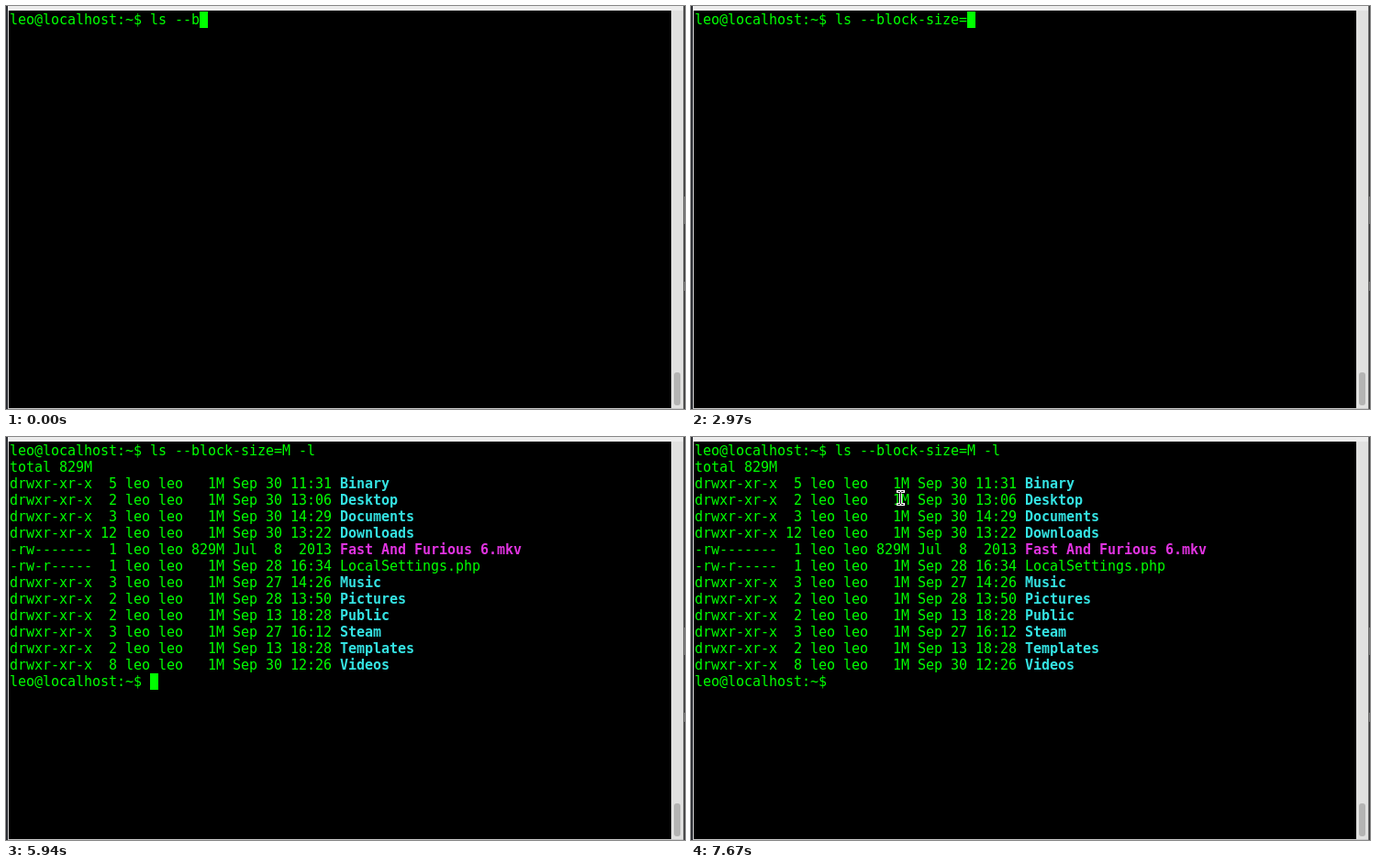
Recreate the animation shown at these times as an HTML page. Size 740x440 px, loop 8 s.

```html
<!DOCTYPE html>
<html lang="en">
<head>
<meta charset="utf-8">
<title>Terminal</title>
<style>
  html, body { margin: 0; width: 100%; height: 100%; overflow: hidden; background: #000; }
  svg { display: block; width: 740px; height: 440px; }
  text { font: 15px "DejaVu Sans Mono", monospace; fill: #0f0; white-space: pre; }
  .dir, .media { font-weight: bold; }
  .dir { fill: #34e2e2; }
  .media { fill: #e033e0; }
</style>
</head>
<body>
<svg id="stage" viewBox="0 0 740 440" xmlns="http://www.w3.org/2000/svg">
  <g shape-rendering="crispEdges">
    <rect width="740" height="440" fill="#000"/>
    <rect width="2" height="440" fill="#2b2d33"/>
    <rect x="2" width="1" height="440" fill="#d4d4d4"/>
    <rect x="2" width="736" height="5" fill="#ededed"/>
    <rect x="725" y="5" width="13" height="435" fill="#e1e1e0"/>
    <rect x="738" width="1" height="440" fill="#6e6e6e"/>
    <rect x="739" width="1" height="440" fill="#3c3c3c"/>
    <rect x="739" y="208" width="1" height="30" fill="#777"/>
    <rect x="739" y="301" width="1" height="10" fill="#777"/>
    <rect x="2" y="439" width="736" height="1" fill="#c8c8c8"/>
  </g>
  <rect x="728" y="400" width="7" height="36" rx="3" fill="#b4b4b3"/>
  <g id="command"></g>
  <g id="listing"></g>
  <rect id="caret" width="9" height="18" fill="#0f0"/>
  <g id="pointer" fill="none">
    <path d="M-3-7H-1L0-6L1-7H3M0-6V6M-3 7H-1L0 6L1 7H3" stroke="#fff" stroke-width="3" stroke-linecap="square"/>
    <path d="M-3-7H-1L0-6L1-7H3M0-6V6M-3 7H-1L0 6L1 7H3" stroke="#000" stroke-width="1"/>
  </g>
</svg>
<script>
const LOOP = 8000, CELL = 9, LINE = 18, LEFT = 4, TOP = 6;
const USER = 'leo';
const PROMPT = USER + '@localhost:~$ ';
const TYPED = 'ls --block-size=M -l';
const START = 6;
const KEYS = [60, 240, 420, 680, 1160, 1560, 1770, 2180, 2560, 2970, 3630, 4740, 5290, 5550];
const ENTER = 5940;

const FILES = [
  ['drwxr-xr-x', 5, '1M', 'Sep 30 11:31', 'Binary', 'dir'],
  ['drwxr-xr-x', 2, '1M', 'Sep 30 13:06', 'Desktop', 'dir'],
  ['drwxr-xr-x', 3, '1M', 'Sep 30 14:29', 'Documents', 'dir'],
  ['drwxr-xr-x', 12, '1M', 'Sep 30 13:22', 'Downloads', 'dir'],
  ['-rw-------', 1, '829M', 'Jul  8  2013', 'Fast And Furious 6.mkv', 'media'],
  ['-rw-r-----', 1, '1M', 'Sep 28 16:34', 'LocalSettings.php', 'file'],
  ['drwxr-xr-x', 3, '1M', 'Sep 27 14:26', 'Music', 'dir'],
  ['drwxr-xr-x', 2, '1M', 'Sep 28 13:50', 'Pictures', 'dir'],
  ['drwxr-xr-x', 2, '1M', 'Sep 13 18:28', 'Public', 'dir'],
  ['drwxr-xr-x', 3, '1M', 'Sep 27 16:12', 'Steam', 'dir'],
  ['drwxr-xr-x', 2, '1M', 'Sep 13 18:28', 'Templates', 'dir'],
  ['drwxr-xr-x', 8, '1M', 'Sep 30 12:26', 'Videos', 'dir']
];

const $ = id => document.getElementById(id);
const command = $('command'), listing = $('listing'), caret = $('caret'), pointer = $('pointer');
const colX = col => LEFT + col * CELL;
const show = (el, on) => el.setAttribute('visibility', on ? 'visible' : 'hidden');

// Places every character on the terminal grid.
function write(parent, str, row, col = 0, cls = '') {
  const el = document.createElementNS('http://www.w3.org/2000/svg', 'text');
  el.setAttribute('x', [...str].map((_, i) => colX(col + i)).join(' '));
  el.setAttribute('y', TOP + row * LINE + 14);
  if (cls) el.setAttribute('class', cls);
  el.textContent = str;
  parent.append(el);
  return el;
}

write(command, PROMPT.trim(), 0);
const letters = [...TYPED].map((ch, i) => write(command, ch, 0, PROMPT.length + i));

write(listing, 'total 829M', 1);
FILES.forEach(([mode, links, size, date, name, cls], i) => {
  const info = [mode, String(links).padStart(2), USER, USER, size.padStart(4), date].join(' ');
  write(listing, info, i + 2);
  write(listing, name, i + 2, 40, cls);
});
write(listing, PROMPT.trim(), 14);

function caretOn(t) {
  if (t < ENTER) return t < 4210 || t >= 4700;
  return t < 6520 || (t >= 7100 && t < 7670);
}

// The pointer sweeps in, rests, then glides to the size column.
const SWEEP = [[707, 218], [590, 188], [503, 165], [487, 157], [481, 154]];
function pointerAt(t) {
  if (t < 6980) return SWEEP[Math.min(4, Math.floor((t - 6670) / 40))];
  const u = Math.min(1, (Math.floor((t - 6980) / 41) + 1) / 9);
  const e = u * u * (3 - 2 * u);
  return [Math.round(481 - 253 * e), Math.round(154 - 88 * e)];
}

function render(t) {
  const count = START + KEYS.filter(k => t >= k).length;
  const done = t >= ENTER;
  letters.forEach((el, i) => show(el, i < count));
  show(listing, done);
  caret.setAttribute('x', colX(PROMPT.length + (done ? 0 : count)));
  caret.setAttribute('y', TOP + (done ? 14 * LINE : 0));
  show(caret, caretOn(t));
  const moving = t >= 6670;
  show(pointer, moving);
  if (moving) {
    const [x, y] = pointerAt(t);
    pointer.setAttribute('transform', `translate(${x + 0.5} ${y + 0.5})`);
  }
}

const origin = performance.now();
function tick() {
  render((performance.now() - origin) % LOOP);
  requestAnimationFrame(tick);
}
render(0);
requestAnimationFrame(tick);
</script>
</body>
</html>
```
